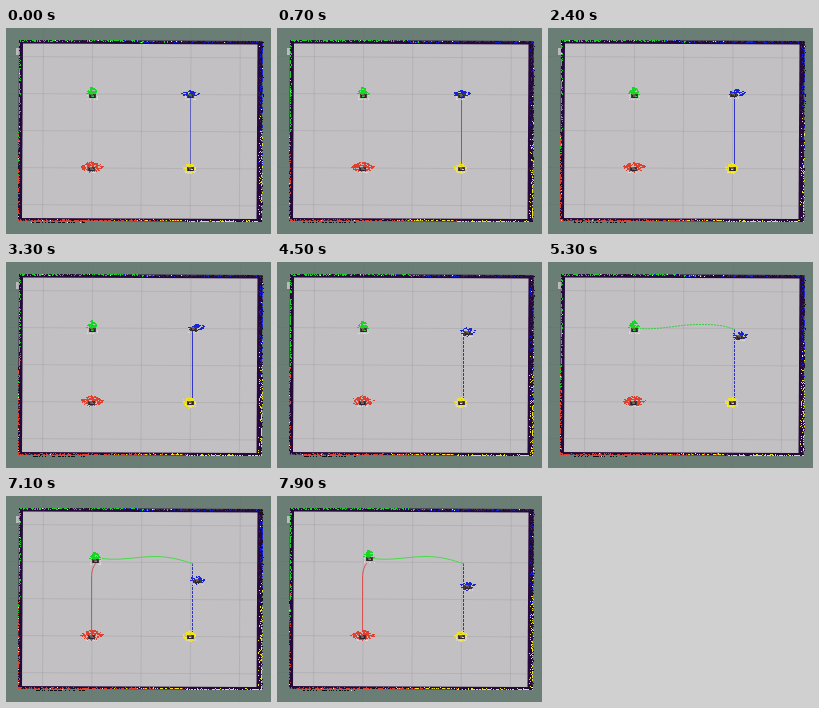
An HTML page with a canvas that plays this animation: 265x206 px, repeating every 8000 ms.

```html
<!DOCTYPE html>
<html lang="en">
<head>
<meta charset="utf-8">
<title>Four robots on a map</title>
<style>
  html, body { margin: 0; width: 100%; height: 100%; overflow: hidden; background: #6b7e75; }
  canvas { display: block; width: 265px; height: 206px; }
</style>
</head>
<body>
<canvas id="stage" width="265" height="206"></canvas>
<script>
const ctx = document.getElementById('stage').getContext('2d');
const LOOP = 8000, STEP = 100;
const GREEN = '#18d527', BLUE = '#1524d8', RED = '#e2402f', YELLOW = '#f0e51c';
const DARK = '#26093c', BLACK = '#130f16', PALE = '#e4e3e5';

// Time, x, y
const bluePath = [[0, 184, 67], [1300, 184, 67], [2400, 185, 66], [3300, 187, 66],
  [4500, 190, 70], [6200, 192, 78], [7900, 190, 90], [8000, 190, 91]];
const greenPath = [[0, 86, 67], [5200, 86, 67], [6200, 86, 66], [7900, 92, 62], [8000, 92, 62]];

function random(seed) {
  let s = (seed * 2654435761) >>> 0;
  return () => {
    s = (s + 0x6d2b79f5) >>> 0;
    let v = Math.imul(s ^ (s >>> 15), s | 1);
    v ^= v + Math.imul(v ^ (v >>> 7), v | 61);
    return ((v ^ (v >>> 14)) >>> 0) / 4294967296;
  };
}

function at(path, t) {
  let i = 1;
  while (i < path.length - 1 && path[i][0] < t) i++;
  const [a, b] = [path[i - 1], path[i]];
  const k = Math.min(1, Math.max(0, (t - a[0]) / (b[0] - a[0])));
  return [a[1] + (b[1] - a[1]) * k, a[2] + (b[2] - a[2]) * k];
}

function box(color, x, y, w = 1, h = 1) {
  ctx.fillStyle = color;
  ctx.fillRect(Math.round(x), Math.round(y), w, h);
}

function quad(color, ...p) {
  ctx.fillStyle = color;
  ctx.beginPath();
  for (let i = 0; i < p.length; i += 2) ctx.lineTo(p[i], p[i + 1]);
  ctx.fill();
}

function stroke(color, d, dash = []) {
  ctx.strokeStyle = color;
  ctx.setLineDash(dash);
  ctx.stroke(new Path2D(d));
}

function floor() {
  box('#6b7e75', 0, 0, 265, 206);
  box('#b9bcbc', 10, 20, 3, 7);
  quad(DARK, 13, 12, 256.5, 13, 255.5, 194, 12, 192.5);
  quad('#c3c0c4', 17, 15.5, 251.5, 16.5, 250.5, 191, 16, 190);
  for (let i = 0; i < 5; i++) {
    const x = 37.5 + i * 49.2, y = 29 + i * 37;
    stroke('rgba(95,98,100,.16)', `M${x} 0L${x - 1} 206`);
    stroke('rgba(95,98,100,.16)', `M0 ${y - .5}L265 ${y + 1}`);
  }
}

// Laser readings along the outer edge: mostly steady, some renewed each step
function walls(step) {
  const keep = random(71), fresh = random(900 + step);
  const pick = () => {
    const a = keep(), b = fresh();
    return fresh() < .25 ? b : a;
  };
  const dot = (color, x, y, odds) => {
    const hit = pick() < odds, shade = pick();
    if (hit) box(shade < .03 ? PALE : shade < .2 ? BLACK : color, x, y);
  };
  for (let x = 14; x < 256; x++) {
    const k = x / 265;
    const top = pick() < (k - .38) * 4 ? BLUE : GREEN;
    const low = pick() < (k - .36) * 3 ? YELLOW : RED;
    dot(top, x, 12 + k, .6);
    dot(top, x, 13 + k, .3);
    dot(low, x, 191.5 + k * 1.5, .7);
    dot(low, x, 190.5 + k * 1.5, .2);
    if (x > 24 && x < 80) {
      dot(RED, x, 193, .35);
      dot(BLACK, x, 194, .5);
    }
  }
  for (let y = 14; y < 193; y++) {
    const lean = (y - 14) / 179;
    const left = pick() < (y - 85) / 65 ? RED : GREEN;
    const right = pick() < (y - 70) / 75 ? YELLOW : BLUE;
    dot(left, 13 - lean, y, .75);
    dot(left, 14 - lean, y, .3);
    dot(right, 255.5 - lean + pick(), y, .7);
    dot(right, 253 - lean + pick() * 2, y, .45);
    if (pick() < .2) box(DARK, 256 - lean + pick(), y);
  }
}

// Pose guesses packed around a robot, thinning toward the sides
function cloud(color, x, y, rx, up, down, count, seed, step) {
  const keep = random(seed), fresh = random(seed * 131 + step);
  for (let i = 0; i < count; i++) {
    const base = [keep(), keep(), keep(), keep()];
    const next = [fresh(), fresh(), fresh(), fresh()];
    const [a, b, c, d] = fresh() < .3 ? next : base;
    const u = a + b - 1;
    const v = (c * (up + down) - up) * (1 - Math.abs(u) * .7);
    box(color, x + u * rx, y + v, d < .6 ? 2 : 1, 1);
  }
}

function robot(color, x, y, seed, step) {
  const r = random(seed * 53 + step);
  x = Math.round(x);
  y = Math.round(y);
  ctx.globalAlpha = .7;
  for (let i = -5; i < 6; i++) {
    if (r() < .5) box(PALE, x + i, y + 4);
    if (r() < .4) box(PALE, x + (i < 0 ? -5 : 5), y + Math.abs(i) - 1);
  }
  ctx.globalAlpha = 1;
  box('#4a3a3c', x - 3, y - 1, 7, 4);
  box('#2d2433', x - 2, y, 5, 3);
  box('#6b5a50', x - 1, y, 3, 2);
  box('#59823e', x - 2, y - 1, 3, 1);
  box(color, x + Math.floor(r() * 3) - 1, y + 1, 2, 1);
}

function paths(t) {
  if (t < 1900) stroke('#6263b8', 'M184.5 69V137');
  else if (t < 3600) stroke('#3336cc', 'M186.5 68V139');
  else stroke('#2f33cc', 'M186.5 67V139', [3, 1]);

  if (t >= 6900) {
    stroke('#47dc48', 'M96 62.5C115 65 131 60.5 149 60.5C164 60.5 176 64 187 68');
    stroke('#d85354', 'M85.5 136V82C85.5 75 87 70 91 66');
  } else if (t >= 5200) {
    stroke('#36cf3e', 'M91 66.5C114 68 130 62.5 150 62.5C166 62.5 177 63 187 68', [2, 1]);
  }
}

function draw(t) {
  const step = Math.floor(t / STEP);
  const [bx, by] = at(bluePath, t), [gx, gy] = at(greenPath, t);
  const settle = Math.min(1, Math.max(0, (t - 1300) / 3000));
  const drift = Math.sin(settle * Math.PI) * 3;
  floor();
  walls(step);
  paths(t);

  cloud(GREEN, gx - .5, gy - 2, 6, 7, 2, 75, 11, step);
  cloud(BLUE, bx + drift, by - 1, 10 - settle * 2, 4, 2 + settle * 3,
    Math.round(95 - settle * 45), 23, step);
  cloud(RED, 85, 139, 12, 6, 5, 140, 37, step);
  cloud(YELLOW, 183, 140, 7, 6, 6, 110, 41, step);

  robot(GREEN, gx, gy, 3, step);
  robot(BLUE, bx, by, 5, step);
  robot(RED, 85, 140, 7, step);
  robot(YELLOW, 184, 140, 9, step);
}

let last = -1;
function frame(now) {
  const t = Math.floor((now % LOOP) / STEP) * STEP;
  if (t !== last) draw(last = t);
  requestAnimationFrame(frame);
}
draw(0);
requestAnimationFrame(frame);
</script>
</body>
</html>
```
